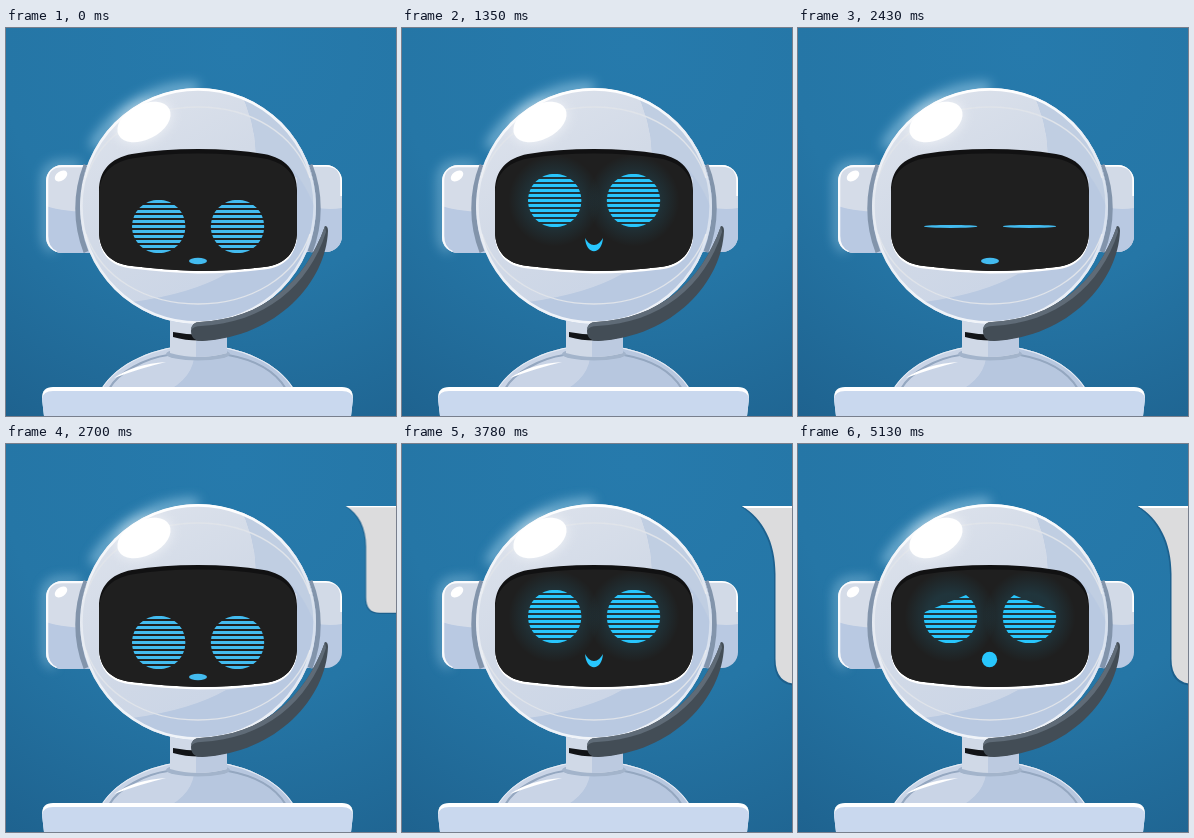
Animation of 390x388 px, one loop 7000 ms. Source, as an HTML page:

```html
<!DOCTYPE html>
<html lang="en">
<head>
<meta charset="utf-8">
<title>Robot helper</title>
<style>
html, body { margin: 0; width: 100%; height: 100%; overflow: hidden; background: #2677a8; }
svg { display: block; width: 100%; height: 100%; }
.step { animation: 7s step-end infinite; }
#face { color: #43bbef; animation-name: tint; }
#eyes { animation-name: lift; }
#open { animation-name: open; }
#shut { visibility: hidden; animation-name: shut; }
#sad { visibility: hidden; animation-name: sad; }
#calm { animation-name: calm; }
#halo { visibility: hidden; animation-name: halo; }
#smile { visibility: hidden; animation-name: smile; }
#bubble { visibility: hidden; transform-origin: 340px 62px; animation-name: pop; }

@keyframes tint {
  0%, 30.857% { color: #43bbef; }
  19.286%, 54%, 100% { color: #28c6fd; }
}
@keyframes lift {
  0%, 30.857% { transform: translateY(0); }
  19.286%, 54%, 100% { transform: translateY(-26px); }
}
@keyframes open {
  0%, 7.714%, 27%, 38.571%, 54%, 61.714% { visibility: visible; }
  3.857%, 23.143%, 34.714%, 50.143%, 57.857%, 69.429%, 100% { visibility: hidden; }
}
@keyframes shut {
  0%, 7.714%, 27%, 38.571%, 54%, 61.714%, 73.286%, 100% { visibility: hidden; }
  3.857%, 23.143%, 34.714%, 50.143%, 57.857%, 69.429% { visibility: visible; }
}
@keyframes sad {
  0% { visibility: hidden; }
  73.286%, 100% { visibility: visible; }
}
@keyframes calm {
  0%, 30.857% { visibility: visible; }
  19.286%, 54%, 100% { visibility: hidden; }
}
@keyframes halo {
  0%, 30.857% { visibility: hidden; }
  19.286%, 54%, 100% { visibility: visible; }
}
@keyframes smile {
  0%, 30.857%, 73.286%, 100% { visibility: hidden; }
  19.286%, 54% { visibility: visible; }
}
@keyframes pop {
  0% { visibility: hidden; transform: scale(.6); }
  38.571% { visibility: visible; transform: scale(.6); }
  42.429% { visibility: visible; transform: scale(1.18); }
  46.286%, 100% { visibility: visible; transform: scale(1); }
}
</style>
</head>
<body>
<svg viewBox="0 0 390 388" preserveAspectRatio="none">
  <defs>
    <radialGradient id="sky" gradientUnits="userSpaceOnUse" cx="230" cy="20" r="470">
      <stop offset="0" stop-color="#267aac"/>
      <stop offset=".5" stop-color="#2576a6"/>
      <stop offset="1" stop-color="#1d5f8b"/>
    </radialGradient>
    <linearGradient id="shell" x1="0" y1="0" x2=".6" y2="1">
      <stop offset="0" stop-color="#dfe4ed"/>
      <stop offset=".5" stop-color="#d2dae7"/>
      <stop offset="1" stop-color="#c9d4e6"/>
    </linearGradient>
    <linearGradient id="rim" x1="0" y1="0" x2="0" y2="1">
      <stop offset="0" stop-color="#fff"/>
      <stop offset=".45" stop-color="#fff" stop-opacity=".35"/>
      <stop offset="1" stop-color="#fff" stop-opacity=".8"/>
    </linearGradient>
    <radialGradient id="beam">
      <stop offset=".5" stop-color="#28c6fd" stop-opacity=".13"/>
      <stop offset="1" stop-color="#28c6fd" stop-opacity="0"/>
    </radialGradient>
    <filter id="soft" x="-50%" y="-50%" width="200%" height="200%"><feGaussianBlur stdDeviation="6"/></filter>
    <clipPath id="headClip"><circle cx="192" cy="178" r="118"/></clipPath>
    <clipPath id="earL"><rect x="40" y="137" width="60" height="88" rx="16"/></clipPath>
    <clipPath id="earR"><rect x="276" y="137" width="60" height="87" rx="16"/></clipPath>
    <clipPath id="bodyClip"><path id="bodyShape" d="M95 361C110 336 148 317 192 317S273 336 288 361Z"/></clipPath>
    <clipPath id="visorClip"><path id="visorShape" d="M192 121Q228 121 258 126C280 130 291 143 291 163V203C291 224 279 237 258 239Q226 243 192 243Q158 242 126 238C105 236 93 224 93 203V163C93 143 104 130 126 126Q156 121 192 121Z"/></clipPath>
    <clipPath id="round"><circle cx="152.700" cy="198.500" r="26.700"/><circle cx="231.500" cy="198.500" r="26.700"/></clipPath>
    <clipPath id="droop">
      <path id="lid" d="M126 196Q126 194.500 128 193.500L168 177A26.700 26.700 0 1 1 126 196Z"/>
      <use href="#lid" transform="translate(384) scale(-1 1)"/>
    </clipPath>
    <path id="stripes" d="M152.500 172V226M231.500 172V226" stroke="currentColor" stroke-width="55" stroke-dasharray="3 2"/>
  </defs>

  <rect width="390" height="388" fill="url(#sky)"/>

  <!-- speech bubble -->
  <g id="bubble" class="step">
    <path d="M340 62H640V241H396Q373 241 373 215V130C373 98 360 75 340 62Z" fill="#174f78" opacity=".55" transform="translate(-1 .8)"/>
    <path d="M340 62H640V240H396Q373.500 240 373.500 215V130C373.500 98 361 75 340 62Z" fill="#dcdcdd"/>
    <path d="M340 62H640V64H343Z" fill="#fff"/>
  </g>

  <!-- ears -->
  <g filter="url(#soft)" opacity=".55" fill="none" stroke="#b4def4" stroke-width="7">
    <path d="M48 222Q40 218 40 206V152Q40 137 56 137H74"/>
    <path d="M88 120A117 117 0 0 1 192 60" stroke-width="12"/>
  </g>
  <g clip-path="url(#earL)">
    <rect x="40" y="137" width="60" height="88" fill="#d5dce8"/>
    <path d="M40 178Q58 184 90 184V226H40Z" fill="#b9c9e2"/>
    <path d="M50 225Q40 221 40 208V153Q40 137 56 137H82" fill="none" stroke="#fff" stroke-width="4.500" opacity=".9"/>
    <ellipse cx="55" cy="148" rx="7" ry="4.500" fill="#fff" transform="rotate(-35 55 148)"/>
  </g>
  <g clip-path="url(#earR)">
    <rect x="276" y="137" width="60" height="87" fill="#d2dae7"/>
    <path d="M286 172Q314 184 336 180V225H286Z" fill="#b9c9e2"/>
    <path d="M302 137H320Q336 137 336 153V168" fill="none" stroke="#fff" stroke-width="3.500"/>
  </g>

  <!-- body and neck -->
  <use href="#bodyShape" fill="#c9d4e6"/>
  <g clip-path="url(#bodyClip)" fill="none">
    <path d="M188 317Q192 345 165 361H288V317Z" fill="#b7c7df"/>
    <path d="M103 361C112 344 140 330 162 327M222 327C250 332 270 344 280 361" stroke="#94a7c0" stroke-width="2"/>
    <path d="M95 361C110 336 148 317 192 317S273 336 288 361" stroke="#e6ecf5" stroke-width="2"/>
    <path d="M108 350Q128 336 160 334Q135 340 108 350Z" fill="#fff"/>
  </g>
  <ellipse cx="192" cy="326" rx="32" ry="6.500" fill="#a3b4cb"/>
  <path d="M164 285H221V325Q192 333 164 325Z" fill="#d0d9e7"/>
  <path d="M190 285H221V325Q206 329 190 329Z" fill="#bccae0"/>
  <path d="M167 304Q192 309 220 305V309Q192 316 167 309Z" fill="#121417"/>

  <!-- head -->
  <path d="M80 137A119 119 0 0 0 80 224M304 137A119 119 0 0 1 304 224" fill="none" stroke="#8294ab" stroke-width="5"/>
  <circle cx="192" cy="178" r="118" fill="url(#shell)"/>
  <g clip-path="url(#headClip)" fill="none">
    <path d="M230 55Q249 90 250 125L291 150V215Q255 243 220 246Q185 266 126 274Q155 300 200 300Q320 290 315 170Q300 80 230 55Z" fill="#b9c9e1"/>
    <path d="M230 55Q249 90 250 125L278 133Q298 150 311 185Q315 90 230 55Z" fill="#c0cee2"/>
    <path d="M80 150C95 105 140 79 192 79S289 105 304 150M80 206C95 250 140 276 192 276S289 250 304 206" stroke="#e0e4ea" stroke-width="1.300"/>
    <circle cx="192" cy="178" r="116.800" stroke="url(#rim)" stroke-width="3"/>
    <path d="M79 140A119 119 0 0 0 79 218M305 140A119 119 0 0 1 305 218" stroke="#8a9cb4" stroke-width="3"/>
  </g>
  <g fill="#fff" transform="rotate(-27 138 94)">
    <ellipse cx="138" cy="94" rx="29" ry="19" filter="url(#soft)" opacity=".55"/>
    <ellipse cx="138" cy="94" rx="28.500" ry="17.500"/>
  </g>

  <!-- visor -->
  <use href="#visorShape" fill="#fff" transform="translate(0 2.500)"/>
  <use href="#visorShape" fill="#111112"/>
  <g clip-path="url(#visorClip)">
    <use href="#visorShape" fill="#1f1f1f" transform="translate(0 4.500)"/>
    <g id="halo" class="step" fill="url(#beam)">
      <circle cx="152.500" cy="172.500" r="46"/>
      <circle cx="231.500" cy="172.500" r="46"/>
    </g>
  </g>

  <!-- face -->
  <g id="face" class="step">
    <g id="eyes" class="step">
      <g id="open" class="step"><g clip-path="url(#round)"><use href="#stripes"/></g></g>
      <g id="shut" class="step" fill="currentColor">
        <ellipse cx="152.700" cy="198.400" rx="26.700" ry="1.500"/>
        <ellipse cx="231.500" cy="198.400" rx="26.700" ry="1.500"/>
      </g>
      <g id="sad" class="step">
        <g clip-path="url(#droop)"><use href="#stripes"/></g>
        <circle cx="191.500" cy="241.500" r="7.700" fill="currentColor"/>
      </g>
    </g>
    <ellipse id="calm" class="step" cx="192" cy="233" rx="9" ry="3.300" fill="currentColor"/>
    <path id="smile" class="step" d="M183 210C183.500 218 187.500 223.300 192 223.300S200.500 218 201 210C198.500 214 196 217 192 217S185.500 214 183 210Z" fill="currentColor"/>
  </g>

  <!-- microphone -->
  <path d="M319 198Q322 198 322 203C320 254 271 309 196 313Q185 313 185 303Q185 294 194 294C256 291 299 255 319 198Z" fill="#434d56"/>
  <path d="M319 198C299 255 256 291 194 294Q186 294 185 302Q188 298 195 298C258 295 303 258 320 204Z" fill="#5f6b77"/>

  <!-- desk -->
  <path d="M36 370Q36 359 47 359H336Q347 359 347 370L345 388H38Z" fill="#fff"/>
  <path d="M36 371Q37 363 47 363H336Q346 363 347 371L345 388H38Z" fill="#c9d8ee"/>
</svg>
</body>
</html>
```
